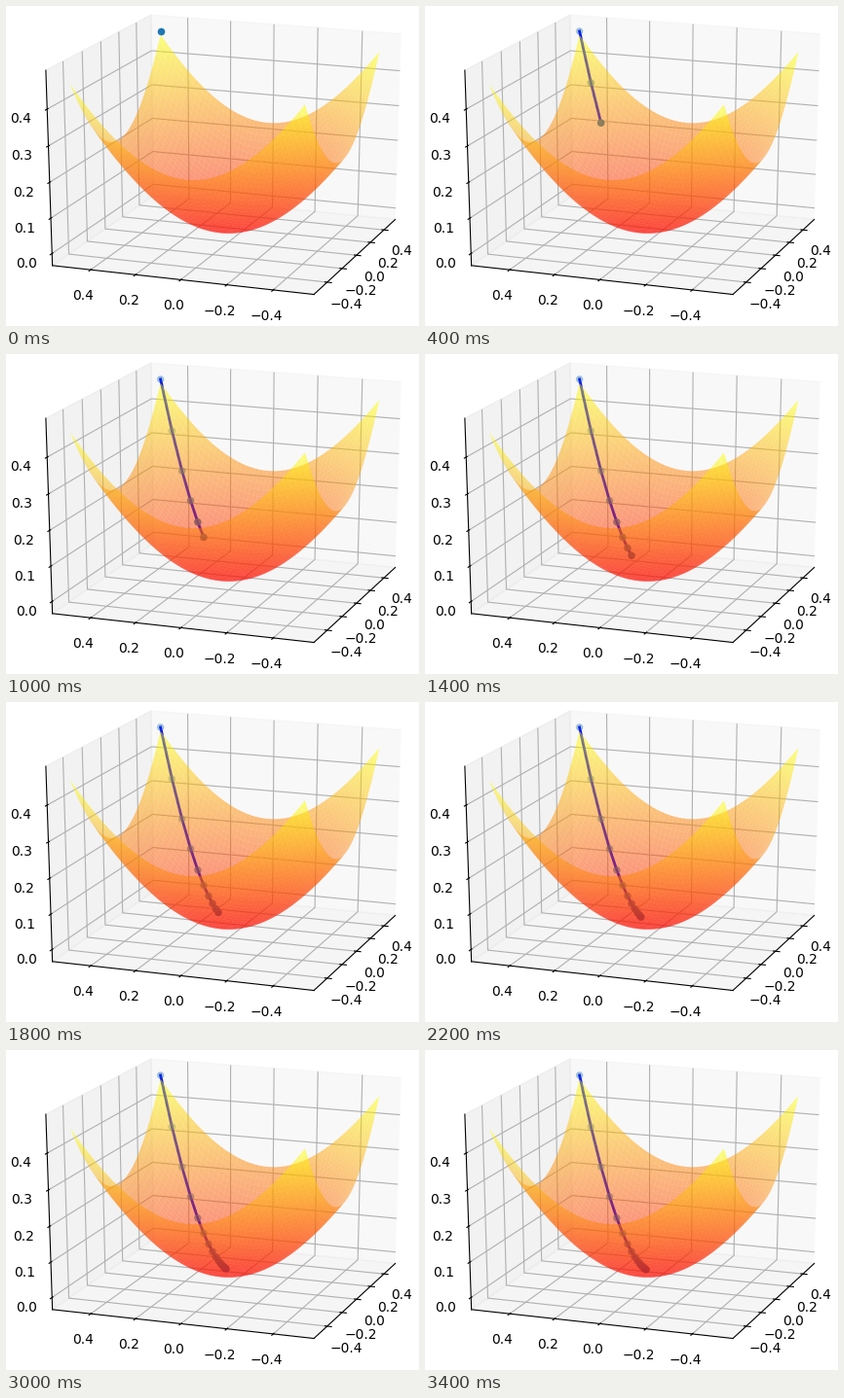
A matplotlib script that plays this animation: 424 px wide and 329 px high, repeating every 3600 ms.

```python
import numpy as np
import matplotlib.pyplot as plt
from matplotlib.animation import FuncAnimation

WIDTH, HEIGHT, DPI = 424, 329, 100
STEPS, INTERVAL = 18, 200
RATE, LIFT = 0.1, 0.01


def bowl(x, y):
    return np.sin(x) ** 2 + np.sin(y) ** 2


def descend(start, count):
    """Gradient descent on the bowl, one row per step."""
    points = [np.array(start)]
    while len(points) < count:
        p = points[-1]
        points.append(p - RATE * np.sin(2 * p))
    return np.array(points)


def padded(low, high):
    """Data range plus a 5% margin and the pane border."""
    mid, half = (low + high) / 2, (high - low) / 2
    half *= 1.1 * 25 / 24
    return mid - half, mid + half


fig = plt.figure(figsize=(WIDTH / DPI, HEIGHT / DPI), dpi=DPI, facecolor="white")
ax = fig.add_axes(
    [-26 / WIDTH, -7.2 / HEIGHT, 496 / WIDTH, 369.6 / HEIGHT], projection="3d"
)
# Keep the wide axes rectangle instead of forcing a square one.
ax.apply_aspect = lambda position=None: None
ax.set_box_aspect((1, 1, 1), zoom=np.sqrt(3) / 1.8294640721620434)
ax.view_init(elev=20, azim=200)

path = descend((0.5, 0.5), STEPS)
heights = bowl(path[:, 0], path[:, 1]) + LIFT

# Antialiased facets without edges, so translucent neighbours do not overlap.
grid = np.linspace(-0.5, 0.5, 51)
X, Y = np.meshgrid(grid, grid)
ax.plot_surface(
    X, Y, bowl(X, Y), rstride=1, cstride=1, cmap="autumn",
    alpha=0.5, linewidth=0, antialiased=True,
)

side_ticks = np.linspace(-0.4, 0.4, 5)
ax.set_xticks(side_ticks)
ax.set_yticks(side_ticks)
ax.set_zticks(np.linspace(0, 0.4, 5))
ax.set_xlim(*padded(-0.5, 0.5))
ax.set_ylim(*padded(-0.5, 0.5))
ax.set_zlim(*padded(0, heights[0]))

trail = []


def draw(step):
    while trail:
        trail.pop().remove()
    xs, ys = path[: step + 1].T
    zs = heights[: step + 1]
    trail.extend(ax.plot(xs, ys, zs, color="b", linewidth=2))
    trail.append(ax.scatter(xs, ys, zs, color="C0", s=20))
    return trail


anim = FuncAnimation(
    fig, draw, frames=STEPS, init_func=lambda: draw(0),
    interval=INTERVAL, repeat=True, repeat_delay=0, blit=False,
)
plt.show()
```
